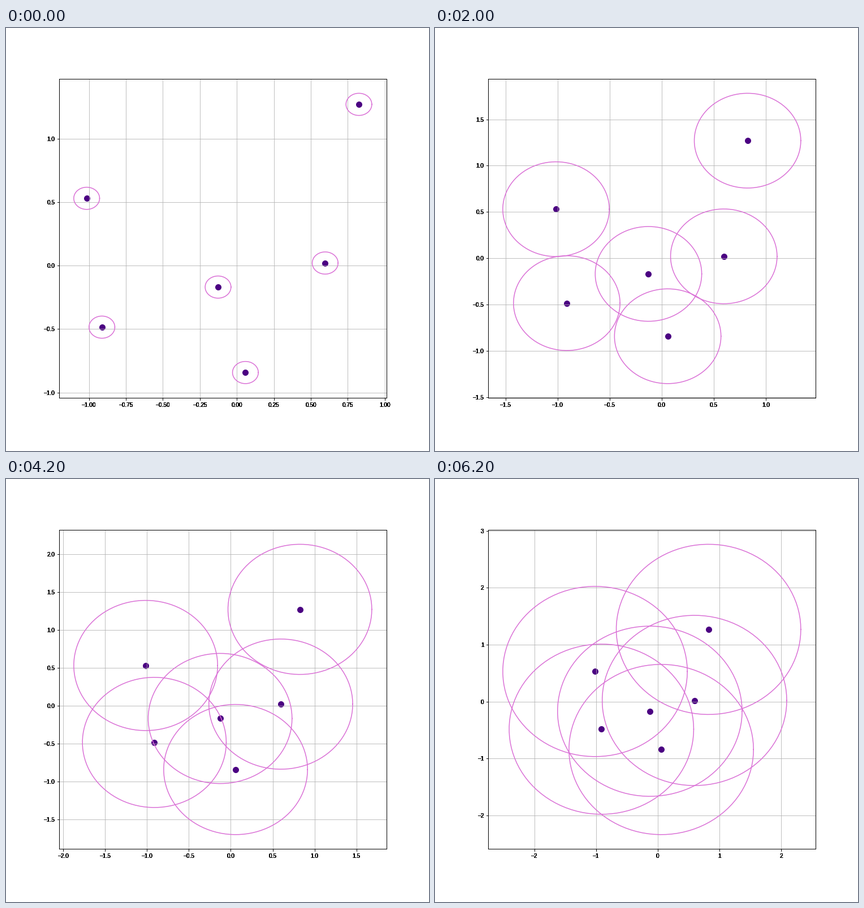
These frames come from a looping animation (748 by 748 pixels, 6.3 s). A matplotlib script:

```python
from itertools import combinations

import matplotlib.pyplot as plt
import numpy as np
from matplotlib.animation import FuncAnimation

plt.rcParams["font.family"] = "Liberation Sans"
plt.rcParams["font.size"] = 10

SUBSTEPS = 4
FRAMES = 63
PAD = 0.05

points = np.array([
    (0.825, 1.270), (-1.015, 0.530), (0.597, 0.0205),
    (-0.127, -0.169), (-0.912, -0.4846), (0.058, -0.842),
])

# Two discs touch when the radius is half the distance between their centres.
touch = sorted(np.hypot(*(a - b)) / 2 for a, b in combinations(points, 2))
stops = [0, *touch, touch[-1] + touch[0]]
theta = np.linspace(0, 2 * np.pi, 100)

fig = plt.figure(figsize=(10.389, 10.389), dpi=72, facecolor="white")
box = [0.125, 0.125, 0.775, 0.755]
ax = fig.add_axes(box)
ax.grid(True)
ax.scatter(*points.T, s=100, color="indigo")
circles = [ax.plot([], [], color="orchid", lw=1.5)[0] for _ in points]

# Overlaid copies of the axis give the labels and ticks hard, heavy edges.
for _ in range(5):
    fig.add_axes(box, sharex=ax, sharey=ax, facecolor="none")


def limits(values, r):
    lo, hi = values.min() - r, values.max() + r
    margin = PAD * (hi - lo)
    return lo - margin, hi + margin


def update(frame):
    r = np.interp((frame + 1) / SUBSTEPS, range(len(stops)), stops)
    for line, (x, y) in zip(circles, points):
        line.set_data(x + r * np.cos(theta), y + r * np.sin(theta))
    ax.set_xlim(*limits(points[:, 0], r))
    ax.set_ylim(*limits(points[:, 1], r))
    return circles


anim = FuncAnimation(fig, update, frames=FRAMES, interval=100,
                     repeat=True, repeat_delay=0, blit=False)
plt.show()
```
